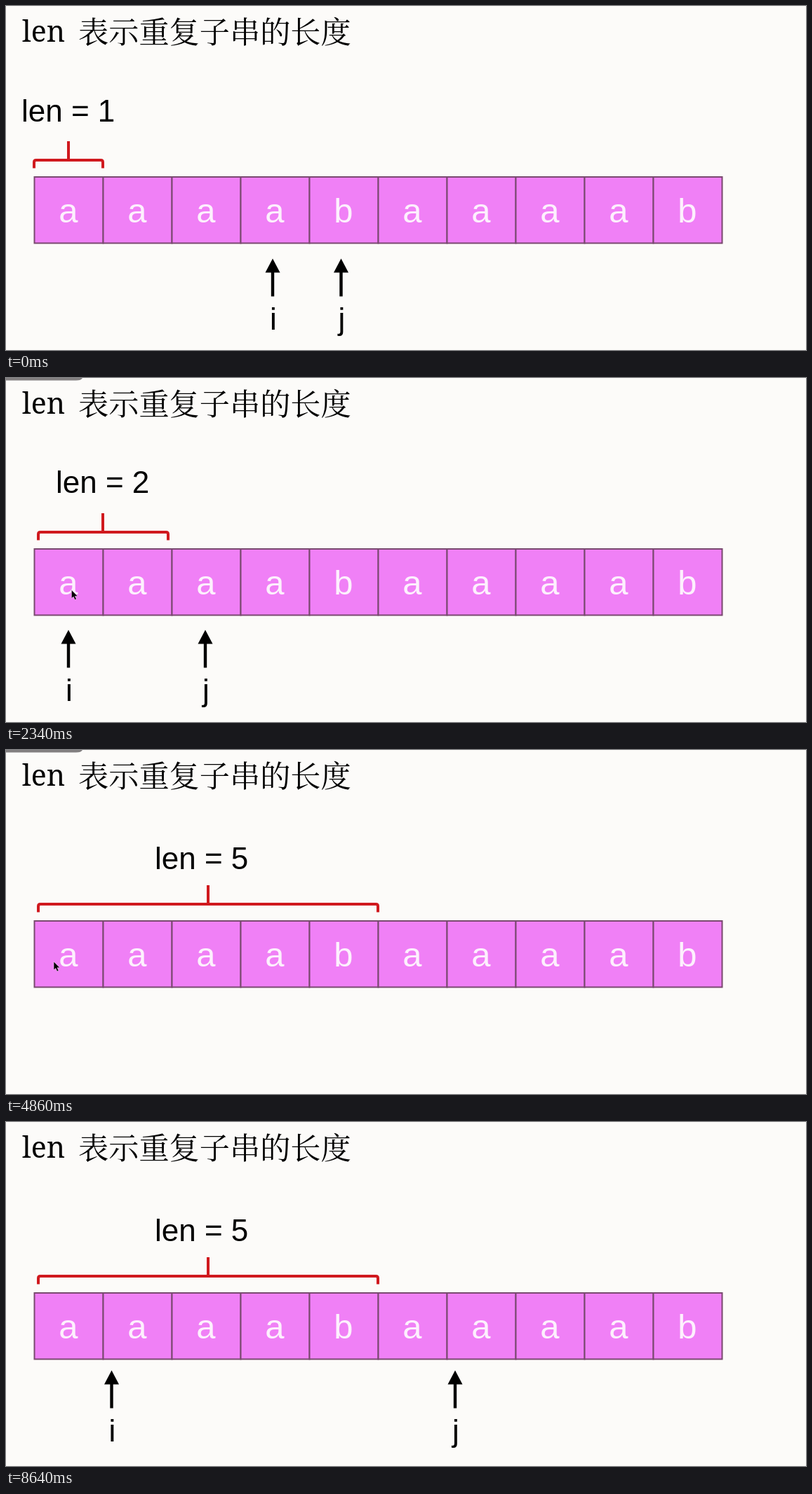
Animation of 1140 by 491 pixels, one loop 8.7 s. Source, as an HTML page:

```html
<!DOCTYPE html>
<html lang="zh">
<head>
<meta charset="utf-8">
<style>
  html, body { margin: 0; width: 100%; height: 100%; overflow: hidden; background: #fcfbf9; }
  svg { display: block; width: 1140px; height: 491px; }
  text { font-family: Arial, "Liberation Sans", sans-serif; font-size: 44px; }
  .latin { font-family: "Noto Serif", serif; font-size: 41px; }
  .han { font-family: "Noto Serif CJK SC", "Noto Sans CJK SC", "Noto Sans CJK", serif; font-size: 43.2px; }
  .cell { fill: #f080f6; stroke: #79496f; stroke-width: 2; }
  .letter { fill: #fdf0fd; font-size: 49px; text-anchor: middle; }
  .pointer text { text-anchor: middle; }
</style>
</head>
<body>
<svg viewBox="0 0 1140 491">
  <path id="tab" d="M0 0H109Q107 3.5 100 3.5H0Z" fill="#827f80"/>
  <text class="latin" x="23" y="51">len</text>
  <text class="han" x="103" y="53">表示重复子串的长度</text>
  <text id="label"></text>
  <path id="brace" fill="none" stroke="#d0191e" stroke-width="4"/>
  <g id="cells"></g>
  <g id="i" class="pointer"><path d="M0 0L10.5 20H2.2V54H-2.2V20H-10.5Z"/><text x="1" y="101.5">i</text></g>
  <g id="j" class="pointer"><path d="M0 0L10.5 20H2.2V54H-2.2V20H-10.5Z"/><text x="1" y="101.5">j</text></g>
  <path id="cursor" d="M0 0V12L2.8 9.6L4.8 14L7 13L5 8.8H8.8Z" stroke="#f9c9fb" stroke-width=".6"/>
</svg>
<script>
const LOOP = 8700;
const el = id => document.getElementById(id);
const set = (node, attrs) => Object.entries(attrs).forEach(([k, v]) => node.setAttribute(k, v));
const show = (id, on) => el(id).setAttribute("visibility", on ? "visible" : "hidden");
const place = (id, x, y) => el(id).setAttribute("transform", `translate(${x} ${y})`);
const progress = (t, from, to) => Math.min(1, Math.max(0, (t - from) / (to - from)));
const ease = p => p * p * (3 - 2 * p);

const stages = [
  { start: 0,    len: 1, text: [22, 165],  brace: [40, 89, 138],  i: 380, j: 477.5, tip: 360.5 },
  { start: 720,  len: 2, text: [71, 164],  brace: [46, 138, 231], i: 89,  j: 284,   tip: 359.5 },
  { start: 2520, len: 3, text: [122, 168], brace: [46, 190, 334], i: 89,  j: 382.5, tip: 354.5 },
  { start: 3420, len: 5, text: [212, 170], brace: [46, 288, 530], i: 89,  j: 578.5, tip: 354.5 }
];
const ARROWS_BACK = 6000;

// Cursor stops: time, x, y
const stops = [[720, 111, 288], [2160, 111, 288], [2520, 76, 317], [3120, 76, 317], [3420, 68, 302], [6240, 68, 302]];

el("cells").innerHTML = [..."aaaabaaaab"].map((c, n) => {
  const x = 40.5 + 98 * n;
  return `<rect class="cell" x="${x}" y="244" width="98" height="94.5"/>
    <text class="letter" x="${x + 48.5}" y="309">${c}</text>`;
}).join("");

function drawCursor(t) {
  const last = stops[stops.length - 1];
  const on = t >= stops[0][0] && t < last[0];
  show("cursor", on);
  if (!on) return;
  const n = stops.findIndex(s => s[0] > t);
  const [t0, x0, y0] = stops[n - 1], [t1, x1, y1] = stops[n];
  const p = ease(progress(t, t0, t1));
  place("cursor", x0 + (x1 - x0) * p, y0 + (y1 - y0) * p);
}

function draw(t) {
  const s = stages.filter(s => s.start <= t).pop();
  const [left, mid, right] = s.brace;
  el("label").textContent = `len = ${s.len}`;
  set(el("label"), { x: s.text[0], y: s.text[1] });
  set(el("brace"), {
    d: `M${left} 231.5V223Q${left} 220 ${left + 3} 220H${right - 3}Q${right} 220 ${right} 223V231.5M${mid} 220V193`
  });

  const shift = 61.5 * progress(t, 6360, 6540);
  for (const id of ["i", "j"]) {
    show(id, s.len < 5 || t >= ARROWS_BACK);
    place(id, s[id] + shift, s.tip);
  }
  show("tab", t >= 720 && t < 7260);
  drawCursor(t);
}

function tick() {
  draw(performance.now() % LOOP);
  requestAnimationFrame(tick);
}
tick();
</script>
</body>
</html>
```
